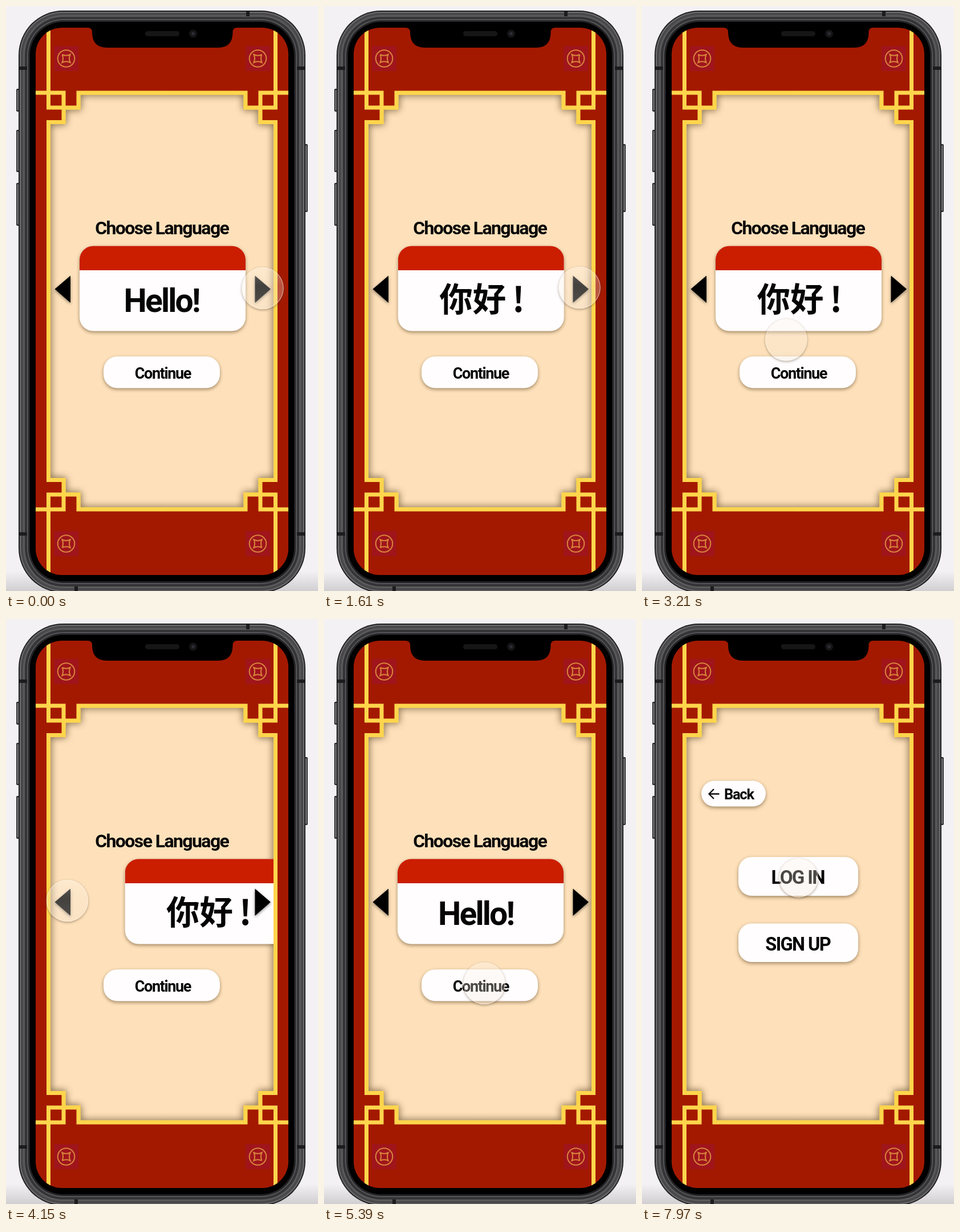
An HTML page with a canvas for the animation above (8 s loop, 547 px wide and 1025 px high).

```html
<!DOCTYPE html>
<html lang="zh-Hans">
<head>
<meta charset="utf-8">
<title>Language picker</title>
<style>
  html, body { margin: 0; width: 100%; height: 100%; overflow: hidden; background: #f3f1f4; }
  canvas { display: block; width: 547px; height: 1025px; }
</style>
</head>
<body>
<canvas id="stage"></canvas>
<script>
const W = 547, H = 1025, LOOP = 8000;
const RED = '#a31900', PEACH = '#fee1ba', GOLD = '#ffd54c', WHITE = '#fffdfe';
const canvas = document.getElementById('stage');
const dpr = window.devicePixelRatio || 1;

function setup(c) {
  c.width = W * dpr;
  c.height = H * dpr;
  const g = c.getContext('2d');
  g.scale(dpr, dpr);
  return g;
}
const ctx = setup(canvas);

// Timing helpers
const clamp = v => Math.max(0, Math.min(1, v));
const span = (t, a, b) => clamp((t - a) / (b - a));
const inOut = p => p < .5 ? 4 * p ** 3 : 1 - (2 - 2 * p) ** 3 / 2;
const mix = (a, b, p) => a + (b - a) * p;

// cubic-bezier(0, 0, .58, 1)
function easeOut(x) {
  let lo = 0, hi = 1;
  for (let i = 0; i < 18; i++) {
    const s = (lo + hi) / 2;
    if (1.74 * s * s * (1 - s) + s ** 3 < x) lo = s; else hi = s;
  }
  return x >= 1 ? 1 : 3 * lo * lo - 2 * lo ** 3;
}

// Drawing helpers
function box(g, l, t, r, b, rad, fill) {
  g.beginPath();
  g.roundRect(l, t, r - l, b - t, rad);
  if (fill) { g.fillStyle = fill; g.fill(); }
}

function withShadow(g, color, blur, dy, draw) {
  g.save();
  g.shadowColor = color;
  g.shadowBlur = blur * dpr;
  g.shadowOffsetY = dy * dpr;
  draw();
  g.restore();
}

function text(g, str, x, y, size, family = 'Roboto, "Liberation Sans"', track = -.05) {
  g.font = `700 ${size}px ${family}, sans-serif`;
  g.letterSpacing = `${track * size}px`;
  g.textAlign = 'center';
  g.fillStyle = '#050505';
  g.fillText(str, x + track * size / 2, y);
}

function button(g, l, t, r, b, rad) {
  withShadow(g, 'rgba(70,45,15,.5)', 6, 2.5, () => box(g, l, t, r, b, rad, WHITE));
}

function line(g, pts) {
  pts.forEach(([x, y], i) => i ? g.lineTo(x, y) : g.moveTo(x, y));
}

// Runs a drawing in all four mirrored corners of the screen
function corners(g, draw) {
  for (const sx of [1, -1]) for (const sy of [1, -1]) {
    g.save();
    g.translate(sx < 0 ? 547 : 0, sy < 0 ? 1034 : 0);
    g.scale(sx, sy);
    draw();
    g.restore();
  }
}

const steps = [[74.5, 517], [74.5, 203.5], [101, 203.5], [101, 178], [127, 178], [127, 152], [273.5, 152]];

function panelPath(g) {
  const flipX = steps.map(([x, y]) => [547 - x, y]).reverse();
  const top = steps.concat(flipX);
  g.beginPath();
  line(g, top.concat(top.map(([x, y]) => [x, 1034 - y]).reverse()));
  g.closePath();
}

function drawCoin(g) {
  g.fillStyle = '#9f151b';
  g.fillRect(84, 70, 43, 44);
  g.strokeStyle = '#d9843c';
  g.lineWidth = 2;
  g.beginPath();
  g.arc(105.5, 92, 14.8, 0, 7);
  g.stroke();
  g.beginPath();
  g.moveTo(98.5, 85);
  g.quadraticCurveTo(105.5, 88.5, 112.5, 85);
  g.quadraticCurveTo(109.5, 92, 112.5, 99);
  g.quadraticCurveTo(105.5, 95.5, 98.5, 99);
  g.quadraticCurveTo(101.5, 92, 98.5, 85);
  g.stroke();
}

function drawFrame(g) {
  g.fillStyle = RED;
  g.fillRect(50, 36, 448, 964);
  corners(g, () => drawCoin(g));

  panelPath(g);
  g.fillStyle = PEACH;
  g.fill();
  g.save();
  g.clip();
  withShadow(g, 'rgba(50,30,0,.85)', 13, 0, () => {
    panelPath(g);
    g.strokeStyle = GOLD;
    g.lineWidth = 7;
    g.stroke();
  });
  g.restore();

  corners(g, () => {
    g.strokeStyle = GOLD;
    g.lineWidth = 7;
    g.beginPath();
    line(g, [[74.5, 38], [74.5, 178], [127, 178], [127, 152], [274, 152]]);
    line(g, [[50, 152], [101, 152], [101, 203.5], [74.5, 203.5], [74.5, 518]]);
    g.stroke();
  });
}

function drawNotch(g) {
  g.fillStyle = '#000';
  g.beginPath();
  g.moveTo(140, 36);
  g.lineTo(143, 38);
  g.quadraticCurveTo(151, 38, 151, 46);
  g.quadraticCurveTo(151, 73, 177, 73);
  g.lineTo(372, 73);
  g.quadraticCurveTo(397.5, 73, 397.5, 46);
  g.quadraticCurveTo(397.5, 38, 405, 38);
  g.lineTo(408, 36);
  g.fill();
  box(g, 244, 44, 304, 53, 4.5, '#161617');
  g.fillStyle = '#151518';
  g.beginPath(); g.arc(328, 48.5, 7, 0, 7); g.fill();
  g.fillStyle = '#2b2b31';
  g.beginPath(); g.arc(328, 48.5, 3, 0, 7); g.fill();
}

function drawPhone(g) {
  g.fillStyle = '#f3f1f4';
  g.fillRect(0, 0, W, H);
  const floor = g.createLinearGradient(0, 990, 0, H);
  floor.addColorStop(0, 'rgba(200,198,201,0)');
  floor.addColorStop(1, 'rgba(200,198,201,.8)');
  g.fillStyle = floor;
  g.fillRect(0, 990, W, 35);

  for (const [t, b] of [[145, 185], [217, 291], [310, 385]]) {
    box(g, 18, t, 26, b, 2, '#252527');
    box(g, 19.5, t + 2, 22, b - 2, 1, '#777779');
  }
  box(g, 521, 242, 529, 361, 2, '#252527');
  box(g, 525, 244, 527.5, 359, 1, '#777779');

  const rims = [[0, '#202022'], [2, '#6c6c6f'], [4, '#48484a'], [8, '#5a5a5c'],
    [11, '#343436'], [15, '#555557'], [17, '#232325'], [20, '#000']];
  for (const [d, color] of rims) {
    box(g, 22 + d, 8 + d, 525 - d, 1028 - d, 78 - d, color);
  }
  g.fillStyle = '#1c1c1e';
  for (const y of [106, 922]) {
    g.fillRect(22, y, 15, 6);
    g.fillRect(510, y, 15, 6);
  }
  g.fillRect(421, 8, 6, 10);
  g.fillRect(120, 1017, 6, 8);

  g.save();
  box(g, 52, 38, 495, 997, 46);
  g.clip();
  drawFrame(g);
  g.restore();
  drawNotch(g);
}

function drawCard(g, x, drawGreeting) {
  g.save();
  g.translate(x, 0);
  button(g, 129, 420.5, 420, 569.5, 24);
  g.save();
  box(g, 129, 420.5, 420, 569.5, 24);
  g.clip();
  g.fillStyle = '#cb1e00';
  g.fillRect(129, 420, 291, 43);
  g.restore();
  drawGreeting();
  g.restore();
}

function drawPicker(g, t) {
  const cjk = '"Noto Sans CJK SC", "Noto Sans CJK"';
  const hello = x => () => text(g, 'Hello!', x, 536, 57);
  const nihao = () => {
    text(g, '你好', 260, 535, 58.5, cjk, 0);
    text(g, '!', 340, 536, 60, cjk, 0);
  };
  const gap = 440;
  const out = easeOut(span(t, 1030, 1630));
  const back = easeOut(span(t, 4083, 4683));

  text(g, 'Choose Language', 274, 400, 32);

  g.save();
  panelPath(g);
  g.clip();
  g.beginPath();
  g.rect(78, 156, 391, 722);
  g.clip();
  if (out < 1) drawCard(g, -gap * out, hello(274));
  if (out > 0 && back < 1) drawCard(g, gap * (1 - out + back), nihao);
  if (back > 0) drawCard(g, gap * (back - 1), hello(267.5));
  g.restore();

  withShadow(g, 'rgba(0,0,0,.45)', 5, 2, () => {
    g.fillStyle = '#000';
    for (const [tip, base] of [[85.5, 113], [464, 436.5]]) {
      g.beginPath();
      line(g, [[tip, 496], [base, 472.5], [base, 520]]);
      g.fill();
    }
  });

  button(g, 171, 614, 375, 669.5, 24);
  text(g, 'Continue', 275.5, 653, 27);
}

function drawLogin(g) {
  button(g, 104, 283.5, 217, 328.5, 22.5);
  text(g, 'Back', 170.5, 315.5, 25.5);
  g.strokeStyle = '#0a0a0a';
  g.lineWidth = 2.3;
  g.beginPath();
  line(g, [[135.5, 306.5], [118, 306.5]]);
  line(g, [[126, 298], [117.5, 306.5], [126, 315]]);
  g.stroke();

  button(g, 169, 417, 379, 485, 23);
  text(g, 'LOG IN', 274, 463.5, 33);
  button(g, 169, 533.5, 379, 601, 23);
  text(g, 'SIGN UP', 274, 580.5, 32.5);
}

function touchAt(t) {
  const drift = span(t, 0, 1610);
  const across = inOut(span(t, 2680, 3690));
  const down = inOut(span(t, 4500, 5250));
  const up = inOut(span(t, 6800, 7600));
  let x = mix(450, 448, drift), y = mix(494.5, 493.5, drift);
  x = mix(x, 107.5, across);
  y += 94 * Math.sin(Math.PI * across);
  x = mix(mix(x, 281, down), 274.5, up);
  y = mix(mix(y, 638.5, down), 453.5, up);

  const press = at => span(t, at - 220, at - 100) * (1 - span(t, at - 40, at + 50));
  const dip = Math.max(press(1030), press(4083), press(5950), span(t, 7800, 7950));
  return { x, y, r: 36.7 - 2.5 * dip };
}

function drawTouch(g, { x, y, r }) {
  // Shadow only outside the translucent disc
  g.save();
  g.beginPath();
  g.rect(0, 0, W, H);
  g.arc(x, y, r, 0, 2 * Math.PI);
  g.clip('evenodd');
  withShadow(g, 'rgba(60,40,20,.5)', 5, 1.5, () => {
    g.fillStyle = '#cbb79a';
    g.beginPath(); g.arc(x, y, r - .5, 0, 7); g.fill();
  });
  g.restore();

  const fill = g.createLinearGradient(0, y - r, 0, y + r);
  fill.addColorStop(0, 'rgba(252,247,240,.38)');
  fill.addColorStop(.45, 'rgba(248,240,230,.27)');
  fill.addColorStop(1, 'rgba(242,232,220,.34)');
  g.fillStyle = fill;
  g.beginPath(); g.arc(x, y, r, 0, 7); g.fill();
  g.strokeStyle = 'rgba(255,246,232,.6)';
  g.lineWidth = 1;
  g.beginPath(); g.arc(x, y, r - .5, 0, 7); g.stroke();
}

function layer(draw) {
  const c = document.createElement('canvas');
  draw(setup(c));
  return c;
}
const phone = layer(drawPhone);
const login = layer(g => { g.drawImage(phone, 0, 0, W, H); drawLogin(g); });

function render(t) {
  const fade = span(t, 5950, 6200);
  if (fade < 1) {
    ctx.drawImage(phone, 0, 0, W, H);
    drawPicker(ctx, t);
  }
  if (fade > 0) {
    ctx.globalAlpha = fade;
    ctx.drawImage(login, 0, 0, W, H);
    ctx.globalAlpha = 1;
  }
  drawTouch(ctx, touchAt(t));
}

const start = performance.now();
function tick() {
  render((performance.now() - start) % LOOP);
  requestAnimationFrame(tick);
}
tick();
</script>
</body>
</html>
```
